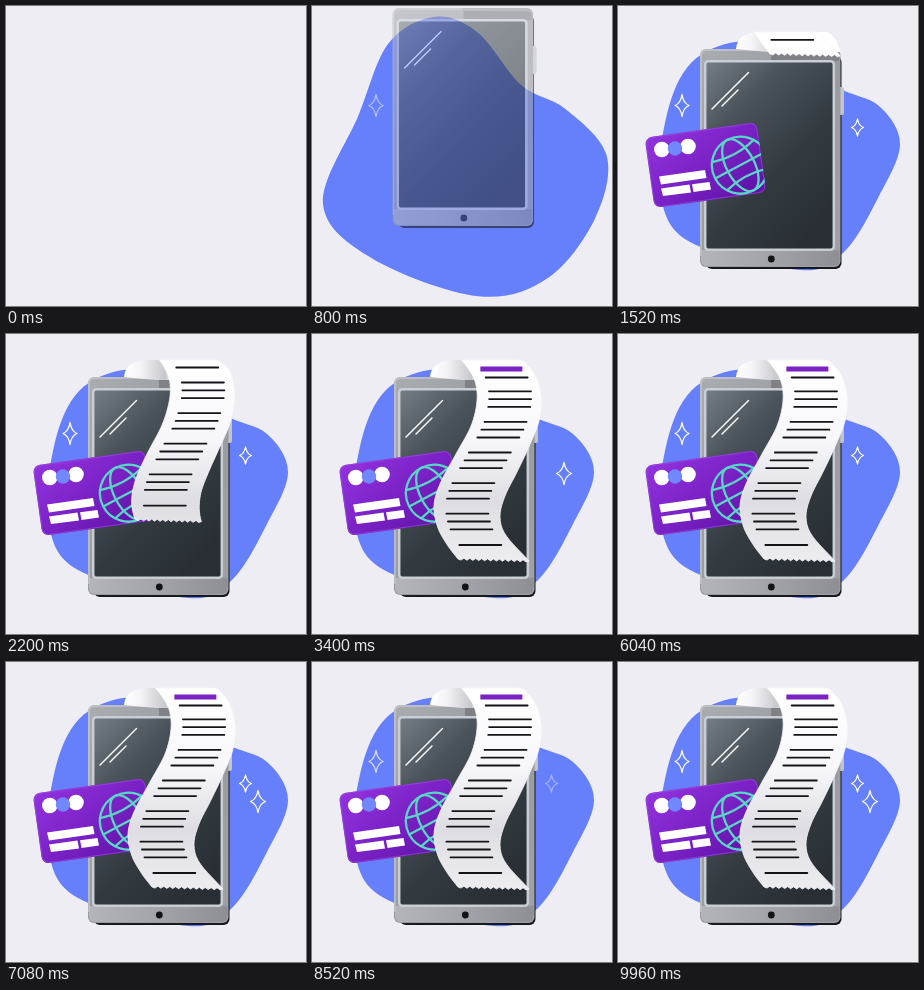
An HTML page for the animation above (10000 ms loop, 300x300 px).

```html
<!DOCTYPE html>
<html lang="en">
<head>
<meta charset="utf-8">
<title>Mobile payment receipt</title>
<style>
html, body { margin: 0; width: 100%; height: 100%; overflow: hidden; background: #eeedf4; }
svg { display: block; width: 100vw; height: 100vh; }
</style>
</head>
<body>
<svg viewBox="0 0 300 300">
  <defs>
    <linearGradient id="body" x1="0" y1="0" x2="1" y2="1">
      <stop offset="0" stop-color="#a9acb1"/><stop offset=".5" stop-color="#979a9f"/><stop offset="1" stop-color="#a0a2a7"/>
    </linearGradient>
    <linearGradient id="bezel" x1="0" x2="1">
      <stop offset="0" stop-color="#b3b5ba"/><stop offset=".5" stop-color="#a2a4a9"/><stop offset="1" stop-color="#8d8f94"/>
    </linearGradient>
    <linearGradient id="screen" x1="0" y1="0" x2=".7" y2="1">
      <stop offset="0" stop-color="#757e85"/><stop offset=".3" stop-color="#4a535a"/><stop offset=".65" stop-color="#333b41"/><stop offset="1" stop-color="#282e34"/>
    </linearGradient>
    <linearGradient id="purple" x1="0" y1="0" x2="1" y2="1">
      <stop offset="0" stop-color="#9332df"/><stop offset=".5" stop-color="#7a22c6"/><stop offset="1" stop-color="#5b10a2"/>
    </linearGradient>
    <linearGradient id="back" x1="0" x2="1">
      <stop offset="0" stop-color="#fff"/><stop offset=".16" stop-color="#f4f4f7"/><stop offset=".4" stop-color="#c6c7cc"/><stop offset=".46" stop-color="#fff"/>
    </linearGradient>
    <linearGradient id="paper" gradientUnits="userSpaceOnUse" x1="0" y1="26" x2="0" y2="228">
      <stop offset="0" stop-color="#fff"/><stop offset=".4" stop-color="#f7f7fa"/><stop offset=".7" stop-color="#dddde3"/><stop offset="1" stop-color="#ededf1"/>
    </linearGradient>
    <clipPath id="face"><rect x="-56.5" y="-35.5" width="113" height="71" rx="7"/></clipPath>
  </defs>

  <path id="blob" fill="#667ffb"/>

  <g id="phone">
    <rect x="88" y="50" width="135.5" height="213" rx="6" fill="#17181b"/>
    <rect x="219" y="81" width="7" height="28" rx="2.5" fill="#c3c5ca"/>
    <rect x="82" y="43" width="140.5" height="218" rx="6" fill="url(#body)"/>
    <path d="M153 46H216Q221 46 221 52V55H153Z" fill="#7f8186"/>
    <path d="M83 244H221.5V254Q221.5 260 214 260H90Q83 260 83 254Z" fill="url(#bezel)"/>
    <path d="M83 250V50Q83 44 89 44H152" fill="none" stroke="#c3c5ca" stroke-width="1.4"/>
    <rect x="87.2" y="55.2" width="128.6" height="188.6" rx="3" fill="url(#screen)" stroke="#c9ced4" stroke-width="2.5"/>
    <path d="M94 103L130.5 66.5M104 100L120 84" stroke="#fff" stroke-width="1.4" stroke-linecap="round"/>
    <circle cx="153.3" cy="253" r="3.4" fill="#141417"/>
  </g>

  <g id="card">
    <g transform="translate(87.5 159) rotate(-8)">
      <rect x="-56.5" y="-35.5" width="113" height="71" rx="7" fill="url(#purple)"/>
      <rect x="-55.8" y="-34.8" width="111.6" height="69.6" rx="6.5" fill="none" stroke="#9c4ddb" opacity=".65"/>
      <g clip-path="url(#face)" fill="none" stroke="#5ad6c4" stroke-width="2.3">
        <g transform="translate(34.5 5) rotate(-20)">
          <circle r="28.5"/>
          <ellipse rx="14" ry="28.5"/>
          <path d="M-28.5 0H28.5M-23.5 -16Q0 -9 23.5 -16M-23.5 16Q0 9 23.5 16"/>
        </g>
      </g>
    </g>
    <g fill="#fff">
      <circle cx="43.8" cy="143.5" r="7.8"/>
      <circle cx="70" cy="140.5" r="7.8"/>
      <circle cx="57" cy="142.5" r="7.2" fill="#7088fb"/>
      <path d="M41 170.5L87 164L88.5 172L43 178.5ZM43 182.5L71.5 178.5L73 186.5L45 190ZM74 178.3L91.5 176L93 183.5L75.5 186Z"/>
    </g>
  </g>

  <g id="receipt">
    <path id="roll" d="M118 43C119 31 128 26 142 26H209C216 29 220 36 222 46H150Z" fill="url(#back)"/>
    <path id="sheet" fill="url(#paper)" stroke="#f6f6f9" stroke-width=".8"/>
    <g id="rows"></g>
  </g>
  <g id="stars" fill="none" stroke="#fff" stroke-width="1.3" stroke-linejoin="round"></g>
</svg>
<script>
const LOOP = 10000;
const $ = id => document.getElementById(id);
const clamp = v => Math.min(1, Math.max(0, v));
const span = (t, a, b) => clamp((t - a) / (b - a));
const mix = (a, b, p) => a + (b - a) * p;
const inOut = p => p < .5 ? 2 * p * p : 1 - 2 * (1 - p) ** 2;
const out = p => 1 - (1 - p) ** 3;
const point = (x, y) => `${x.toFixed(2)} ${y.toFixed(2)}`;
const add = (parent, tag, attrs) => {
  const el = document.createElementNS("http://www.w3.org/2000/svg", tag);
  for (const k in attrs) el.setAttribute(k, attrs[k]);
  return parent.appendChild(el);
};

// Background blob: overshoot shape and resting shape
const wide = [[124,12],[78,38],[48,110],[12,198],[62,252],[165,289],[235,271],[282,212],[293,150],[252,104],[208,80],[166,28]];
const rest = [[117,36],[73,57],[49,108],[42,185],[72,236],[182,264],[226,246],[261,190],[282,138],[261,100],[218,81],[160,44]];

function closed(pts) {
  const n = pts.length, at = i => pts[(i + n) % n];
  let d = "M" + point(...pts[0]);
  for (let i = 0; i < n; i++) {
    const [a, b, c, e] = [at(i - 1), at(i), at(i + 1), at(i + 2)];
    const c1 = point(b[0] + (c[0] - a[0]) / 6, b[1] + (c[1] - a[1]) / 6);
    const c2 = point(c[0] - (e[0] - b[0]) / 6, c[1] - (e[1] - b[1]) / 6);
    d += `C${c1} ${c2} ${point(...c)}`;
  }
  return d + "Z";
}

const settle = t => inOut(span(t, 760, 1070));

function drawBlob(t) {
  const grow = 1.015 * inOut(span(t, 40, 760)), m = settle(t);
  const pts = wide.map(([x, y], i) => [
    mix(153 + (x - 153) * grow, rest[i][0], m),
    mix(150 + (y - 150) * grow, rest[i][1], m)
  ]);
  $("blob").setAttribute("d", grow ? closed(pts) : "");
}

// Paper edges as [y, x] curves
const leftEdge = [[26,149],[33,155],[47,163],[67,165],[92,159],[120,144],[150,128],[172,122],[194,126],[212,136],[225,146]];
const rightEdge = [[26,207],[37,221],[62,229],[87,227],[117,215],[140,204],[162,193],[182,188],[200,193],[227,217]];

function edge(pts, y) {
  const n = pts.length;
  let i = 0;
  while (i < n - 2 && y > pts[i + 1][0]) i++;
  const slope = j => {
    const a = pts[Math.max(0, j - 1)], b = pts[Math.min(n - 1, j + 1)];
    return (b[1] - a[1]) / (b[0] - a[0]);
  };
  const [y0, x0] = pts[i], [y1, x1] = pts[i + 1];
  const h = y1 - y0, p = clamp((y - y0) / h), q = 1 - p;
  return x0 * q * q * (1 + 2 * p) + x1 * p * p * (3 - 2 * p) + h * p * q * (slope(i) * q - slope(i + 1) * p);
}

// Printed rows: a heading, one line, five groups of three, a last line
const rowYs = [35, 43.5];
for (let i = 0; i < 15; i++) rowYs.push(57.3 + 30.6 * Math.floor(i / 3) + 7.8 * (i % 3));
rowYs.push(211);
const rows = rowYs.map((y, i) => ({
  y,
  el: add($("rows"), "path", {
    stroke: i ? "#141418" : "#7a22c4", "stroke-width": i ? 1.8 : 5, "stroke-linecap": i ? "round" : "butt"
  })
}));

function drawReceipt(t) {
  const rise = out(span(t, 1240, 1440));
  const feed = inOut(span(t, 1280, 2640));
  $("receipt").setAttribute("visibility", rise ? "visible" : "hidden");
  $("roll").setAttribute("transform", `translate(0 ${(44 * (1 - rise)).toFixed(2)}) scale(1 ${rise.toFixed(3)})`);

  // The tail keeps its curl while the paper settles into its bends
  const end = mix(36, 225, feed), shift = 225 - end, top = mix(44, 26, rise);
  const bend = (pts, y) => mix(edge(pts, y + shift) + 5, edge(pts, y), feed);
  const tail = end + 2, left = [], right = [], teeth = [];
  for (let k = 0; k <= 50; k++) {
    const yl = mix(top, end, k / 50), yr = mix(top, tail, k / 50);
    left.push(point(bend(leftEdge, yl), yl));
    right.unshift(point(bend(rightEdge, yr), yr));
  }
  const xl = bend(leftEdge, end), xr = bend(rightEdge, tail);
  for (let k = 1; k < 24; k++) {
    teeth.push(point(mix(xl, xr, k / 24), mix(end, tail, k / 24) + (k % 2 ? 1 : -1)));
  }
  $("sheet").setAttribute("d", "M" + [...left, ...teeth, ...right].join("L") + "Z");
  for (const r of rows) {
    const y = r.y - shift;
    r.el.setAttribute("d", y > 29 ? `M${point(bend(leftEdge, y) + 12, y)}h42` : "");
  }
}

// Sparkles with their visible spans
const stars = [
  { x: 64, y: 99.5, w: 7, h: 11, on: [[650, 2600], [4400, 6600], [8300, 11000]] },
  { x: 239.5, y: 121.5, w: 6, h: 8.5, on: [[1060, 3100], [4500, 7300], [8400, 11000]] },
  { x: 252, y: 139.5, w: 7.5, h: 11, on: [[2400, 4400], [6200, 8100], [9400, 11000]] }
];
for (const s of stars) {
  const { x, y, w, h } = s, k = .2;
  const q = (sx, sy, ex, ey) => `Q${x + sx * w * k} ${y + sy * h * k} ${x + ex * w} ${y + ey * h}`;
  s.el = add($("stars"), "path", {
    d: `M${x} ${y - h}${q(1, -1, 1, 0)}${q(1, 1, 0, 1)}${q(-1, 1, -1, 0)}${q(-1, -1, 0, -1)}Z`
  });
}

function place(id, dx, dy, alpha) {
  $(id).setAttribute("transform", `translate(${dx.toFixed(2)} ${dy.toFixed(2)})`);
  $(id).setAttribute("opacity", alpha.toFixed(3));
}

function draw(t) {
  drawBlob(t);
  const drop = 1 - settle(t);
  place("phone", -1.5 * drop, -42.5 * drop, span(t, 640, 920));
  place("card", -24 * (1 - out(span(t, 1040, 1460))), 0, span(t, 1040, 1320));
  drawReceipt(t);
  for (const s of stars) {
    const alpha = Math.max(...s.on.map(([a, b]) => Math.min(span(t, a, a + 300), 1 - span(t, b - 50, b + 250))));
    s.el.setAttribute("opacity", alpha.toFixed(3));
  }
}

const start = performance.now();
function frame() {
  draw((performance.now() - start) % LOOP);
  requestAnimationFrame(frame);
}
draw(0);
requestAnimationFrame(frame);
</script>
</body>
</html>
```
